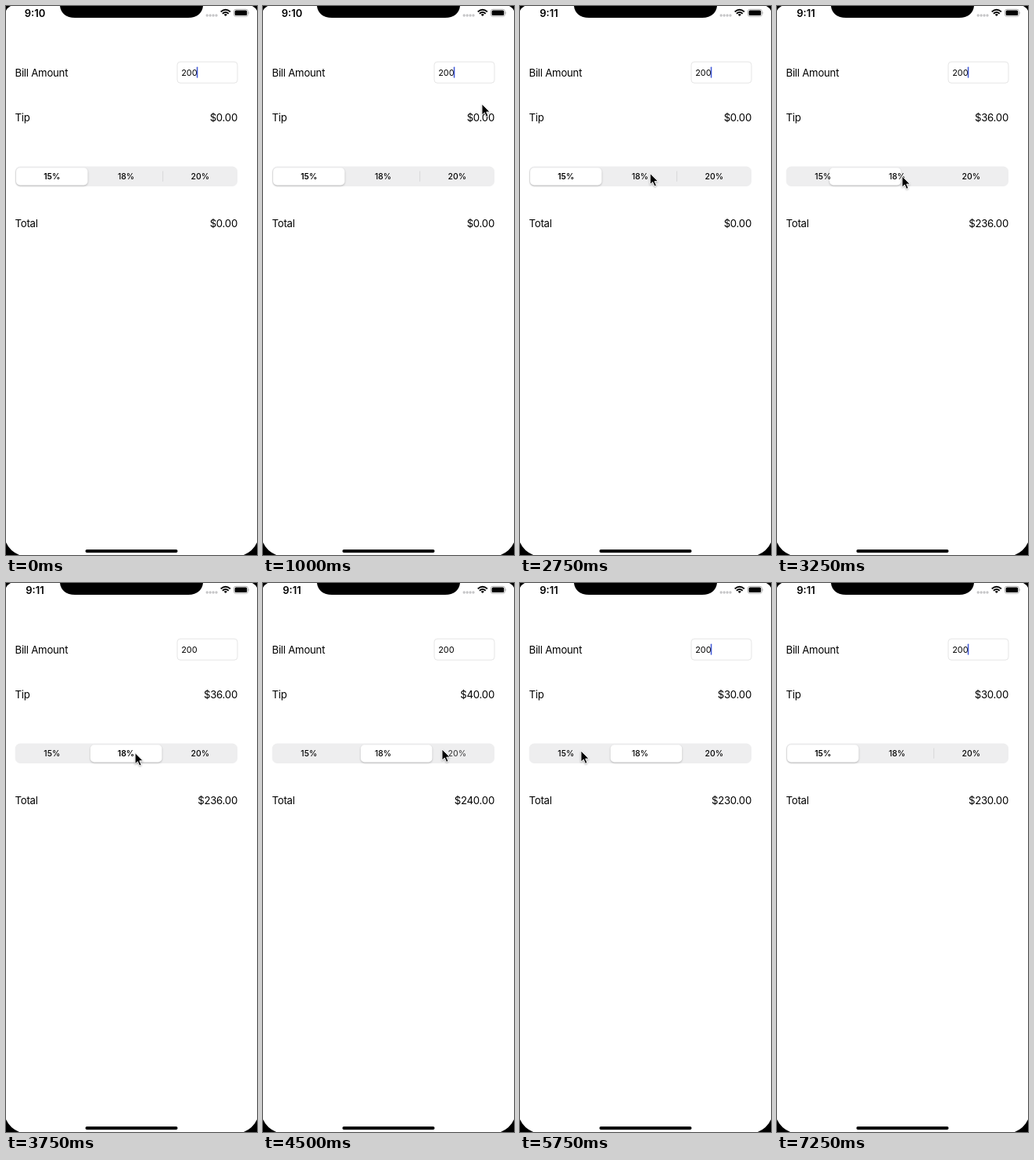
Animation, 321 px wide and 700 px high, one loop 7500 ms. Source, as an HTML page:

```html
<!DOCTYPE html>
<html lang="en">
<head>
<meta charset="utf-8">
<title>Tip calculator</title>
<style>
  html, body { margin: 0; width: 100%; height: 100%; overflow: hidden; background: #fff; }
  svg { display: block; width: 100%; height: 100%; }
  text { font: 400 13.2px Inter, "Liberation Sans", sans-serif; letter-spacing: -.24px; }
  .end { text-anchor: end; }
  .mid { text-anchor: middle; letter-spacing: 0; }
  #clock { font-size: 13px; font-weight: 600; }
  #field { font-size: 10.9px; letter-spacing: 0; }
  #labels text { font-size: 10.4px; font-weight: 500; }
  #pill { filter: drop-shadow(0 1px 1.2px rgba(0, 0, 0, .24)); }
  #cursor { filter: drop-shadow(0 1.2px 1px rgba(0, 0, 0, .3)); }
</style>
</head>
<body>
<svg viewBox="0 0 321 700">
  <!-- device frame -->
  <path d="M0 0H6Q2 2 0 6ZM321 0H315Q319 2 321 6ZM0 684Q5 695 17 700H0ZM321 684Q316 695 304 700H321Z"/>
  <path d="M69 0C70 9 77 15 88 15H233C244 15 251 9 252 0Z"/>
  <rect x="101.5" y="693" width="118" height="4" rx="2"/>

  <!-- status bar -->
  <text id="clock" class="mid" x="37" y="13.6"></text>
  <path d="M257.2 12H270" stroke="#c6c6c8" stroke-width="3.4" stroke-linecap="round" stroke-dasharray="0 3.93"/>
  <g fill="none" stroke="#000" stroke-width="1.9">
    <path d="M274.7 7.4Q280.8 2 286.9 7.4M276.9 9.8Q280.8 6.4 284.7 9.8"/>
    <path d="M278.7 10.9Q280.8 9.3 282.9 10.9L280.8 13Z" fill="#000" stroke="none"/>
  </g>
  <rect x="291.4" y="4.3" width="18" height="9" rx="2.6" fill="none" stroke="#a8a8a8" stroke-width=".9"/>
  <rect x="292.6" y="5.5" width="15.6" height="6.6" rx="1.5"/>
  <path d="M310.5 7.2Q312 8.8 310.5 10.4Z" fill="#999"/>

  <!-- form -->
  <text x="11.5" y="89.8">Bill Amount</text>
  <rect x="219" y="71.2" width="77" height="27" rx="4" fill="#fff" stroke="#e3e3e3" stroke-width=".9"/>
  <text id="field" x="224.2" y="88.8">200</text>
  <rect id="caret" x="243.8" y="77.5" width="1.5" height="14.3" rx=".7" fill="#4059d8"/>
  <text x="11.5" y="146.7">Tip</text>
  <text id="tip" class="end" x="296" y="146.7"></text>
  <text x="11.5" y="282.4">Total</text>
  <text id="total" class="end" x="296" y="282.4"></text>

  <!-- segmented control -->
  <rect x="11.7" y="204.6" width="284.3" height="25.4" rx="6.5" fill="#eeeeef"/>
  <g stroke="#d6d6d8" stroke-width=".9">
    <path id="leftDivider" d="M106.2 210.5V223.8"/>
    <path id="rightDivider" d="M200.6 210.5V223.8"/>
  </g>
  <rect id="pill" y="206.2" width="91.5" height="22.2" rx="5" fill="#fff"/>
  <g id="labels">
    <text class="mid" x="58.8" y="220.8">15%</text>
    <text class="mid" x="153.5" y="220.8">18%</text>
    <text class="mid" x="248.3" y="220.8">20%</text>
  </g>

  <path id="cursor" d="M0 0V14L3.3 11L5.6 16.3L8 15.3L5.7 10.1H10.1Z" stroke="#fff" stroke-width=".9" stroke-linejoin="round"/>
</svg>
<script>
const LOOP = 7500, STEP = 250;
const TRAVEL = 900, SLIDE = 400;              // cursor move and pill slide, ms
const BLINK = 780, LIT = 480;                 // caret period and lit part, ms
const SEGMENT = 94.9, BILL = 200, PERCENTS = [15, 18, 20];

// Where the cursor arrives and when; a tap then selects a segment.
const stops = [
  { at: 500, x: 297, y: 131 },
  { at: 1000, x: 280, y: 125 },
  { at: 2000, x: 171, y: 211 },
  { at: 3250, x: 160, y: 217, tap: 3031, segment: 1 },
  { at: 4500, x: 229, y: 212, tap: 4392, segment: 2 },
  { at: 5750, x: 78, y: 214, tap: 5561, segment: 0 }
];
const taps = stops.filter(stop => stop.tap);
const leaves = 6500;

const $ = id => document.getElementById(id);
const labels = [...$('labels').children];
const show = (el, on) => el.setAttribute('visibility', on ? 'visible' : 'hidden');
const money = n => '$' + n.toFixed(2);
const mix = (a, b, u) => a + (b - a) * u;

function ease(u) {
  u = Math.min(1, Math.max(0, u));
  return u * u * (3 - 2 * u);
}

function drawCursor(t) {
  let { x, y } = stops[0];
  for (const stop of stops) {
    const u = ease((t - stop.at) / TRAVEL + 1);
    x = mix(x, stop.x, u);
    y = mix(y, stop.y, u);
  }
  show($('cursor'), t >= stops[0].at && t < leaves);
  $('cursor').setAttribute('transform', `translate(${x} ${y})`);
}

function drawControl(t) {
  let selected = 0, slide = 1, position = 0;
  for (const { tap, segment } of taps.filter(({ tap }) => t >= tap)) {
    selected = segment;
    slide = ease((t - tap) / SLIDE);
    position = mix(position, segment, slide);
  }
  $('pill').setAttribute('x', 13 + SEGMENT * position);
  show($('leftDivider'), position === 2);
  show($('rightDivider'), position === 0);
  labels.forEach((label, i) => {
    label.style.fontWeight = position === i ? 600 : 500;
    label.style.opacity = selected === i && slide < .3 ? .7 : 1;
  });

  const tip = t < taps[0].tap ? 0 : BILL * PERCENTS[selected] / 100;
  $('tip').textContent = money(tip);
  $('total').textContent = money(tip && BILL + tip);
}

function draw() {
  const now = performance.now() % LOOP;
  const t = now - now % STEP;
  $('clock').textContent = t < 2500 ? '9:10' : '9:11';
  show($('caret'), t % BLINK < LIT);
  drawControl(t);
  drawCursor(t);
  requestAnimationFrame(draw);
}
draw();
</script>
</body>
</html>
```
